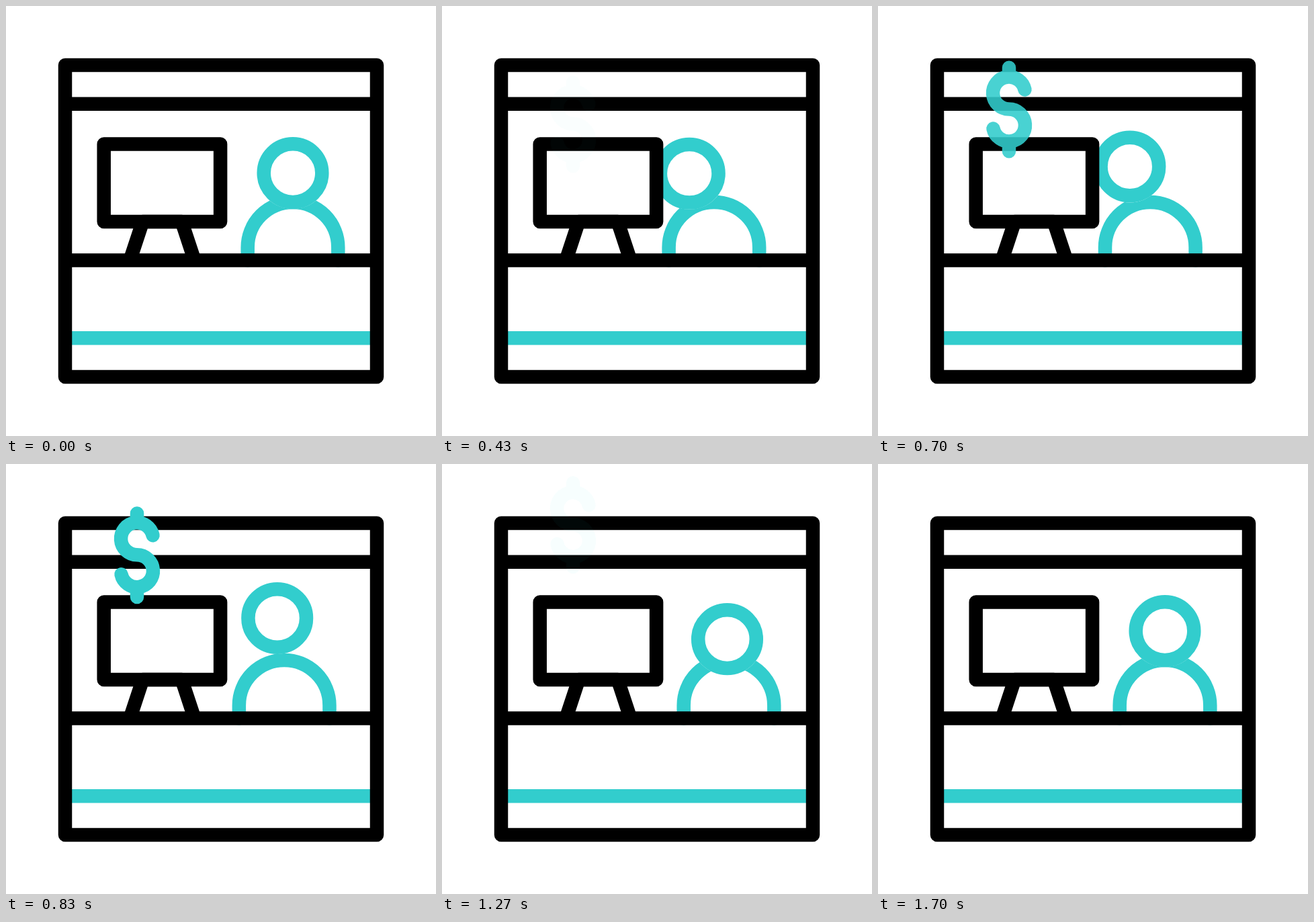
An HTML page for the animation above (2000 ms loop, 640 by 640 pixels).

```html
<!DOCTYPE html>
<html lang="en">
<head>
<meta charset="utf-8">
<title>Service desk</title>
<style>
  html, body { margin: 0; width: 100%; height: 100%; overflow: hidden; background: #fff; }
  svg { display: block; width: 100vw; height: 100vh; }
  .line { fill: none; stroke: #000; stroke-width: 20.5; stroke-linecap: round; stroke-linejoin: round; }
  .teal { stroke: #32cdcd; }
  .solid { fill: #fff; }
</style>
</head>
<body>
<svg viewBox="0 0 640 640">
  <path id="body" class="line teal" d="M359.7 378.5V359.2a67.3 67.3 0 0 1 134.6 0V378.5"/>
  <g id="head">
    <circle cx="427" cy="248.6" r="53.5" fill="#fff"/>
    <circle class="line teal" cx="427" cy="248.6" r="43.3"/>
  </g>
  <path class="line teal" d="M98 494.2H542"/>
  <rect class="line solid" x="145.7" y="205.5" width="173.4" height="115.5"/>
  <path class="line" d="M186.6 372L203.5 320.9H261.5L278.4 372"/>
  <path class="line" d="M88 88H552V552H88ZM88 145.7H552M88 378.6H552"/>
  <path id="dollar" class="line teal" d="M218.5 79A24 24 0 1 0 195 108A24 24 0 1 1 171.5 137M195 46.2V60M195 156V170.8"/>
</svg>
<script>
  const LOOP = 2000, STEP = 100 / 3;
  const [body, head, dollar] = ["body", "head", "dollar"].map(id => document.getElementById(id));

  // Eased progress from 0 to 1 between two times.
  const ease = (t, from, to) => {
    const p = Math.min(1, Math.max(0, (t - from) / (to - from)));
    return p * p * (3 - 2 * p);
  };
  // Bulge that is zero at both ends of a move and 1 halfway.
  const arc = s => 4 * s * (1 - s);
  // Rises to 1 at the middle time and falls back to 0.
  const swing = (t, from, mid, to) => ease(t, from, mid) - ease(t, mid, to);

  const move = (el, x, y) => el.setAttribute("transform", `translate(${x.toFixed(2)} ${y.toFixed(2)})`);

  function moveHead(t) {
    const lean = ease(t, 0, 550), back = ease(t, 567, 1010);
    const nod = swing(t, 1010, 1267, 1520), settle = ease(t, 1520, 1700);
    const x = -66.5 * (lean - back) - 2.5 * nod;
    const y = 1.7 * arc(lean) - 8.7 * arc(back) - 17.3 * (back - settle) + 29.3 * nod;
    move(head, x, y);
  }

  function draw(now) {
    const t = Math.floor((now % LOOP + 3.4) / STEP) * STEP;
    move(body, -25.7 * swing(t, 0, 567, 1100), 0);
    moveHead(t);
    move(dollar, 0, 67.8 - 86 * ease(t, 400, 1300));
    dollar.style.opacity = ease(t, 400, 779) - ease(t, 1000, 1300);
  }

  const start = performance.now();
  function tick() {
    draw(performance.now() - start);
    requestAnimationFrame(tick);
  }
  tick();
</script>
</body>
</html>
```
